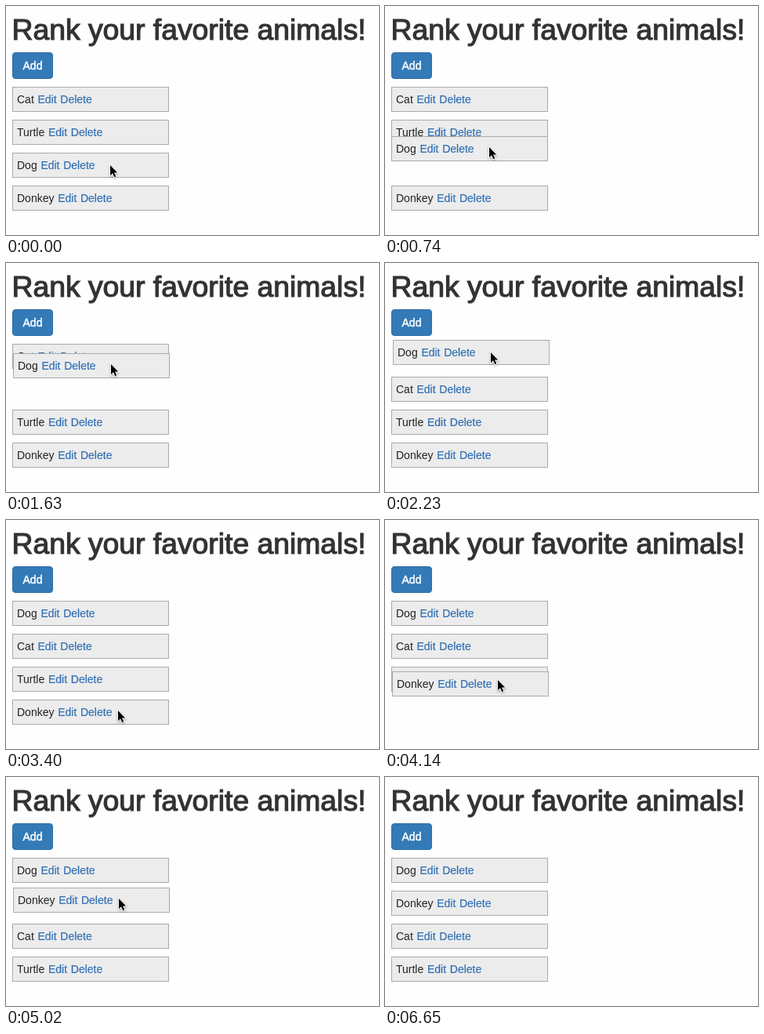
Animation of 476 by 292 pixels, one loop 6.75 s. Source, as an HTML page:

```html
<!DOCTYPE html>
<html lang="en">
<head>
<meta charset="utf-8">
<title>Sortable list</title>
<style>
  html, body { margin: 0; width: 100%; height: 100%; overflow: hidden; background: #fefefe; }
  body { position: relative; font: 14px/20px "Liberation Sans", Arial, sans-serif; color: #222; }
  h1, .button, .item, #cursor { position: absolute; box-sizing: border-box; margin: 0; white-space: nowrap; }
  h1 { left: 7.5px; top: 10px; font-size: 37.3px; line-height: 41px; font-weight: 400; color: #333; -webkit-text-stroke: 1.2px #333; }
  .button { left: 8px; top: 59px; width: 52px; height: 34px; padding: 6px 0; text-align: center;
    color: #fff; background: #337ab7; border: 1px solid #2e6da4; border-radius: 4px; -webkit-text-stroke: .5px #fff; }
  .item { left: 0; top: 0; width: 200px; height: 32px; padding: 5px; background: #ececec; border: 1px solid #aaa; }
  .link { color: #2f6fb5; margin-left: .8px; -webkit-text-stroke: .2px #2f6fb5; }
  #cursor { left: 0; top: 0; z-index: 2; overflow: visible; filter: drop-shadow(0 1px 1px #0005); }
</style>
</head>
<body>
<h1>Rank your favorite animals!</h1>
<div class="button">Add</div>
<svg id="cursor" width="12" height="18">
  <path transform="scale(.94)" d="M0 0V14L3.2 11 5.6 16.2 7.8 15.2 5.4 10.2H9.8Z" stroke="#fff" stroke-width="2" paint-order="stroke"/>
</svg>
<script>
const LOOP = 6750, STEP = 147.8;   // the screen refreshes once per STEP
const CURSOR_HIDDEN = 40;
const LEFT = 8, TOP = 103, PITCH = 42, HALF = 16;
const names = ["Cat", "Turtle", "Dog", "Donkey"];

// Cursor strokes, timed in refresh steps; a named one drags that item by its grab point.
const moves = [
  { name: "Dog", from: 3, to: 15, drop: 16, start: [133, 203], end: [135, 114], power: 1.5, grab: [125, 16] },
  { from: 16, to: 19, start: [135, 114], end: [138, 257], power: 1.3 },
  { from: 20, to: 23, start: [138, 257], end: [143, 243], power: 1.3 },
  { name: "Donkey", from: 25, to: 34, drop: 37, start: [144, 243], end: [144, 155], power: 1.3, grab: [135, 14] },
];

const cursor = document.getElementById("cursor");
const items = {};
for (const name of names) {
  const item = items[name] = document.createElement("div");
  item.className = "item";
  item.innerHTML = `${name} <span class="link">Edit</span> <span class="link">Delete</span>`;
  document.body.append(item);
}

const mix = (a, b, part) => a + (b - a) * part;
const slotTop = slot => TOP + PITCH * slot;

// While dragging, the pointer runs slightly ahead of the item.
function pose({ from, to, start, end, power, grab }, step) {
  const part = Math.min(1, Math.max(0, (step - from) / (to - from)));
  const x = Math.floor(mix(start[0], end[0], part));
  const y = mix(start[1], end[1], 1 - (1 - part) ** power);
  const lead = grab ? 3 * Math.sin(Math.PI * part) : 0;
  return { pointer: [x, y - lead], item: grab && [x - grab[0], y - grab[1]] };
}

// An item dragged upwards takes a slot once the pointer passes that slot's middle.
function orderAt(step) {
  const order = [...names];
  for (const move of moves) {
    if (!move.name || step <= move.from) continue;
    const pointerY = pose(move, step).pointer[1];
    let slot = order.indexOf(move.name);
    order.splice(slot, 1);
    while (slot > 0 && pointerY < slotTop(slot - 1) + HALF) slot--;
    order.splice(slot, 0, move.name);
  }
  return order;
}

function place(element, [x, y]) {
  element.style.transform = `translate(${x}px, ${Math.round(y)}px)`;
}

function draw(time) {
  const step = Math.floor((time % LOOP + 10) / STEP);
  const move = moves.findLast(m => step > m.from) ?? moves[0];
  const { pointer, item } = pose(move, step);
  orderAt(step).forEach((name, slot) => {
    const held = name === move.name && step > move.from && step < move.drop;
    place(items[name], held ? item : [LEFT, slotTop(slot)]);
    items[name].style.zIndex = held ? 1 : 0;
  });
  place(cursor, pointer);
  cursor.style.visibility = step < CURSOR_HIDDEN ? "visible" : "hidden";
}

const begin = performance.now();
function tick() {
  draw(performance.now() - begin);
  requestAnimationFrame(tick);
}
tick();
</script>
</body>
</html>
```
